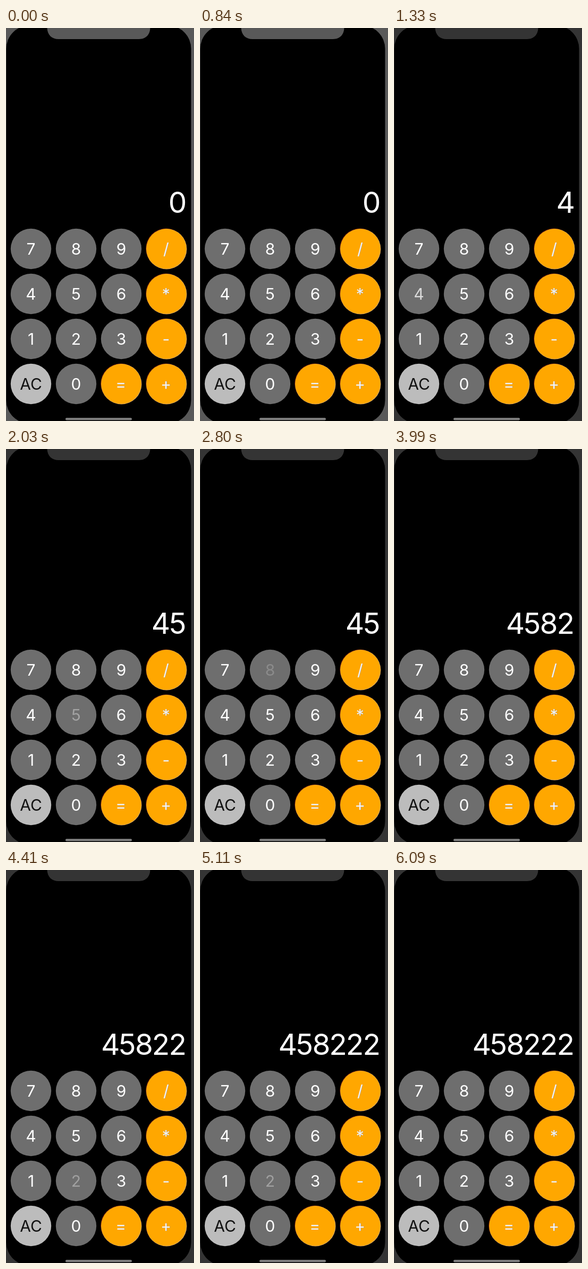
An HTML page that plays this animation: 354 by 742 pixels, repeating every 6.16 s.

```html
<!DOCTYPE html>
<html lang="en">
<head>
<meta charset="utf-8">
<title>Calculator</title>
<style>
  html, body { margin: 0; width: 100%; height: 100%; overflow: hidden; background: #000; }
  svg { display: block; width: 354px; height: 742px; }
  text { font-family: Inter, Roboto, sans-serif; text-anchor: middle; fill: #fff; }
  .key { font-size: 30px; }
  .digit { font-size: 55px; }
</style>
</head>
<body>
<svg id="stage" viewBox="0 0 354 742">
  <rect id="bezel" width="354" height="742"/>
  <rect x="0.5" y="-5" width="348" height="752" rx="44"/>
  <path id="notch" d="M77.5 0C78 13 86 21 99 21H250C263 21 271 13 271.5 0Z"/>
  <rect x="112" y="736" width="125" height="4.4" rx="2.2" fill="#7d7d7d"/>
  <g id="keys"></g>
  <g id="display"></g>
</svg>
<script>
const LOOP = 6160, STEP = 70;
const FADE_IN = 150, FADE_OUT = 250, DIM = 0.2;
const FOCUS_AT = 980;
const KEYS = ['789/', '456*', '123-', 'A0=+'];
const PRESSES = [
  { key: '4', down: 1015, up: 1180 },
  { key: '5', down: 1750, up: 1950 },
  { key: '8', down: 2610, up: 2860 },
  { key: '2', down: 3510, up: 3770 },
  { key: '2', down: 4080, up: 4335 },
  { key: '2', down: 4790, up: 5035 }
];

const byId = id => document.getElementById(id);
const labels = {};

function add(parent, tag, attrs, content = '') {
  const node = document.createElementNS('http://www.w3.org/2000/svg', tag);
  for (const name in attrs) node.setAttribute(name, attrs[name]);
  node.textContent = content;
  return parent.appendChild(node);
}

function drawKey(name, cx, cy) {
  const keys = byId('keys');
  const isOperator = '/*-+='.includes(name);
  const disc = (dx, dy, r, fill) => add(keys, 'circle', { cx: cx + dx, cy: cy + dy, r, fill });
  const label = (dx, fill) => add(keys, 'text',
    { class: 'key', x: cx + dx, y: cy + 11, style: `fill:${fill}` }, name === 'A' ? 'AC' : name);

  if (isOperator) {
    disc(-0.9, -0.7, 38, '#611500');
    disc(0.3, 0.3, 38.2, '#d9a65c');
    disc(-0.1, -0.1, 37.6, '#ffa700');
    label(0.2, '#b99b68');
    labels[name] = label(-0.7, '#f0f3fa');
  } else {
    disc(0, 0, 38.2, name === 'A' ? '#bcbcbc' : '#6e6e6e');
    labels[name] = label(0, name === 'A' ? '#111' : '#fff');
  }
}

KEYS.forEach((row, j) => [...row].forEach((name, i) => drawKey(name, 47 + 85 * i, 417 + 85 * j)));

// Digit cells run from right to left.
const cells = PRESSES.map((_, i) =>
  add(byId('display'), 'text', { class: 'digit', x: 323.2 - 31.6 * i, y: 349.3 }));

const ease = p => p < 0.5 ? 2 * p * p : 1 - 2 * (1 - p) ** 2;
const progress = (t, start, length) => ease(Math.min(1, Math.max(0, (t - start) / length)));

function render(t) {
  const bezel = t < FOCUS_AT ? '#595959' : '#343434';
  byId('bezel').setAttribute('fill', bezel);
  byId('notch').setAttribute('fill', bezel);

  const opacity = {};
  for (const { key, down, up } of PRESSES) {
    const pressed = progress(t, down, FADE_IN) - progress(t, up, FADE_OUT);
    opacity[key] = Math.min(opacity[key] ?? 1, 1 - (1 - DIM) * pressed);
  }
  for (const key in opacity) labels[key].setAttribute('opacity', opacity[key]);

  const entered = PRESSES.filter(p => t >= p.up).map(p => p.key);
  const digits = entered.length ? entered.reverse() : ['0'];
  cells.forEach((cell, i) => { cell.textContent = digits[i] ?? ''; });
}

const start = performance.now();
function tick() {
  const t = (performance.now() - start) % LOOP;
  render(Math.floor(t / STEP) * STEP);
  requestAnimationFrame(tick);
}
tick();
</script>
</body>
</html>
```
